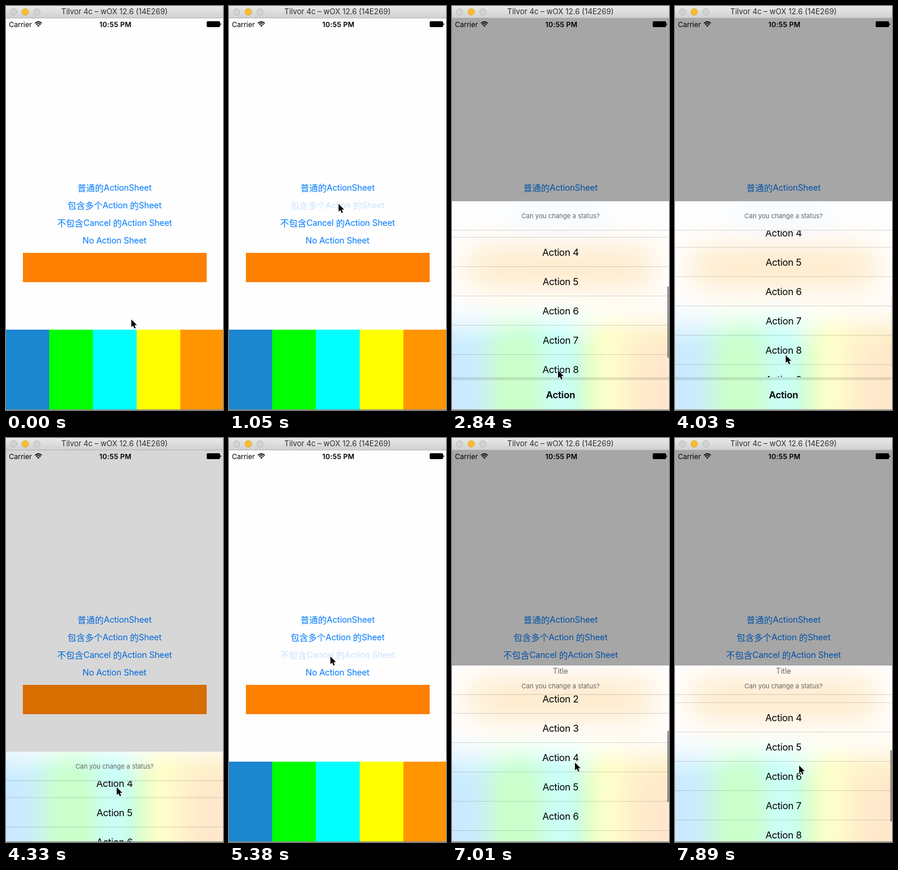
Write an HTML page that moves like this. It is 372 px wide and 689 px high and loops after 8 s.

```html
<!DOCTYPE html>
<html lang="en">
<head>
<meta charset="utf-8">
<title>Action sheets</title>
<style>
  html, body { margin: 0; width: 100%; height: 100%; overflow: hidden; }
  body { position: relative; background: #fefefe; color: #000; font-family: Inter, "Noto Sans CJK SC", "Noto Sans CJK JP", sans-serif; }
  #stage, #stage div, #stage svg { position: absolute; box-sizing: border-box; }
  #stage { left: 0; top: 0; width: 372px; height: 689px; overflow: hidden; }
  .line { left: 0; width: 372px; text-align: center; white-space: nowrap; }

  .page { left: 0; top: 0; width: 372px; height: 689px; background: #fefefe; }
  .link { height: 30px; line-height: 30px; color: #007aff; font-size: 14.6px; letter-spacing: -.17px; }
  .link i { position: relative; top: 1px; font-style: normal; font-size: 15px; letter-spacing: 0; }
  .bar { left: 29px; top: 421px; width: 315px; height: 50px; background: #ff8000; }
  .col { top: 552px; height: 240px; }

  #status { left: 0; top: 21px; width: 372px; height: 21px; font-size: 12px; line-height: 21px; }
  #dim { left: 0; top: 21px; width: 372px; height: 668px; background: #000; }

  .sheet { left: 0; width: 372px; overflow: hidden; background: #fff; }
  .glass { left: 0; width: 372px; height: 689px; opacity: .2; }
  .glass .page { left: -100px; width: 572px; height: 800px; filter: blur(30px) saturate(1.8); }
  .glass .shift { left: 100px; top: 0; width: 372px; height: 800px; }
  .head { left: 0; top: 0; width: 372px; height: 50px; border-bottom: 1px solid rgba(0,0,0,.16); color: #666; }
  .msg { font-size: 11px; line-height: 20px; height: 20px; }
  .title { font-size: 12.7px; line-height: 20px; top: 0; height: 20px; }
  .list { left: 0; top: 50px; width: 372px; height: 250px; overflow: hidden; }
  .rows { left: 0; top: 0; width: 372px; }
  .row { height: 50px; line-height: 50px; font-size: 16.5px; letter-spacing: -.33px; border-bottom: 1px solid rgba(0,0,0,.14); }
  .thumb { left: 369px; width: 2.5px; height: 122px; border-radius: 2px; background: rgba(0,0,0,.4); }
  .gap { left: 0; top: 300px; width: 372px; height: 5px; background: rgba(0,0,0,.1); }
  .cancel { top: 305px; border: 0; font-weight: 600; letter-spacing: -.25px; }

  #chrome { left: 0; top: 0; width: 372px; height: 21px; background: linear-gradient(#e9e9e9, #d1d1d1); border-bottom: 1px solid #b4b4b4; font-size: 12.9px; line-height: 20px; color: #2e2e2e; }
  .dot { top: 4px; width: 12px; height: 12px; border-radius: 50%; background: #d2d2d2; border: 1px solid #b9b9b9; }
  #edge { left: 0; top: 688px; width: 372px; height: 1px; background: #858585; }
  #cursor { left: 0; top: 0; overflow: visible; }
</style>
</head>
<body>
<div id="stage">
  <div class="page" id="page">
    <div class="shift">
      <div class="line link" style="top:295px"><i>普通的</i>ActionSheet</div>
      <div class="line link" style="top:325px"><i>包含多个</i>Action <i>的</i>Sheet</div>
      <div class="line link" style="top:355px"><i>不包含</i>Cancel <i>的</i>Action Sheet</div>
      <div class="line link" style="top:385px">No Action Sheet</div>
      <div class="bar"></div>
      <div class="col" style="left:-100px;width:174px;background:#1a87cf"></div>
      <div class="col" style="left:74px;width:75px;background:#0f0"></div>
      <div class="col" style="left:149px;width:75px;background:#0ff"></div>
      <div class="col" style="left:224px;width:75px;background:#ff0"></div>
      <div class="col" style="left:299px;width:173px;background:#ff9500"></div>
    </div>
  </div>

  <div id="status">
    <div style="left:5px">Carrier</div>
    <svg style="left:49px;top:5px" width="13" height="10" viewBox="0 0 13 10" fill="none" stroke="#000" stroke-width="1.7">
      <path d="M.7 3.6Q6.5-1.6 12.3 3.6M2.7 5.8Q6.5 2.3 10.3 5.8"/>
      <path d="M6.5 9.6L4.4 7.4Q6.5 5.6 8.6 7.4Z" fill="#000" stroke="none"/>
    </svg>
    <div class="line" style="left:1.5px;font-weight:600;letter-spacing:.2px">10:55 PM</div>
    <svg style="left:344px;top:5px" width="25" height="11" viewBox="0 0 25 11">
      <rect width="23" height="10" rx="2"/>
      <path d="M23.4 3.2Q25 3.8 25 5T23.4 6.8Z"/>
    </svg>
  </div>

  <div id="dim"></div>
  <div class="sheet" id="many"></div>
  <div class="sheet" id="plain"></div>

  <div id="chrome">
    <div class="dot" style="left:7px"></div>
    <div class="dot" style="left:27px;background:#fdbd2f;border-color:#e0a02a"></div>
    <div class="dot" style="left:47px"></div>
    <div class="line">Tilvor 4c – wOX 12.6 (14E269)</div>
  </div>
  <div id="edge"></div>
  <svg id="cursor" width="14" height="20" viewBox="0 0 14 20">
    <path transform="translate(.8 1.4) scale(.92)" d="M0 0V14.6L3.4 11.4 5.8 17 8.2 16 5.9 10.6H10.4Z" stroke="#fff" stroke-width="1.1" paint-order="stroke"/>
  </svg>
</div>

<script>
// The screen refreshes in even steps; all times are in seconds.
const LOOP = 8, STEP = .14875, SLIDE = .3;
const $ = id => document.getElementById(id);
const links = document.querySelectorAll('#page .link');

const clamp = u => Math.min(1, Math.max(0, u));
const ease = u => (u = clamp(u), u * u * (3 - 2 * u));

// The pointer glides from place to place; a drag scrolls the open list and coasts on.
const hand = [];
let spot = { x: 214, y: 533 };
function move(start, end, x, y, coast) {
  hand.push({ start, end, x, y, coast, from: spot });
  spot = { x, y };
}
const drag = move;

move(.1, .85, 187, 336);
move(1.2, 1.8, 182, 563);
drag(1.82, 2.4, 181, 448, 32);
move(2.4, 2.6, 181, 661);
drag(2.6, 2.993, 181, 594, 7);
move(3, 3.4, 189, 594);
move(4.3, 5, 173, 371);
move(5.36, 5.65, 199, 444);
move(5.65, 6.3, 209, 640);
drag(6.4, 6.85, 210, 545, 28);
move(6.9, 7.4, 211, 620);
drag(7.45, 7.88, 212, 557, 0);

const sheets = [
  { el: $('many'), link: links[1], top: 333, height: 355, open: 1.04, close: 4.15, cancel: 'Action' },
  { el: $('plain'), link: links[2], top: 388, height: 300, open: 5.35, close: 9, title: 'Title' }
];

function build(s) {
  const rows = Array.from({ length: 10 }, (_, i) =>
    `<div class="line row" style="top:${i * 50}px">Action ${i}</div>`).join('');
  s.el.style.top = s.top + 'px';
  s.el.style.height = s.height + 'px';
  s.el.innerHTML = `
    <div class="glass" aria-hidden="true"></div>
    <div class="head">
      ${s.title ? `<div class="line title">${s.title}</div>` : ''}
      <div class="line msg" style="top:${s.title ? 25 : 15}px">Can you change a status?</div>
    </div>
    <div class="list"><div class="rows">${rows}</div><div class="thumb"></div></div>
    ${s.cancel ? `<div class="gap"></div><div class="line row cancel">${s.cancel}</div>` : ''}`;
  const copy = $('page').cloneNode(true);
  copy.removeAttribute('id');
  s.glass = s.el.querySelector('.glass');
  s.glass.append(copy);
  s.rows = s.el.querySelector('.rows');
  s.thumb = s.el.querySelector('.thumb');
  s.drags = hand.filter(h => h.coast !== undefined && h.start > s.open && h.start < s.close);
}

const moveTo = (el, x, y) => { el.style.transform = `translate(${Math.round(x)}px, ${Math.round(y)}px)`; };
const progress = (h, t) => ease((t - h.start) / (h.end - h.start));

function drawSheet(s, t) {
  const shown = ease((t - s.open) / SLIDE) * (1 - ease((t - s.close) / SLIDE));
  const drop = Math.round((1 - shown) * s.height);
  let scroll = 0, glow = 0;
  for (const d of s.drags) {
    if (t < d.start) break;
    scroll += (d.from.y - d.y) * progress(d, t);
    scroll += d.coast * (1 - Math.exp(-Math.max(0, t - d.end) / .08));
    glow = clamp(1 - (t - d.end - .7) / .35);
  }
  s.el.style.visibility = shown > 0 ? 'visible' : 'hidden';
  s.link.style.opacity = Math.abs(t - s.open) < STEP / 2 ? .2 : 1;
  s.thumb.style.opacity = glow;
  moveTo(s.el, 0, drop);
  moveTo(s.glass, 0, -s.top - drop);
  moveTo(s.rows, 0, -scroll);
  moveTo(s.thumb, 0, 3 + scroll * .489);
  return shown;
}

function draw(t) {
  $('dim').style.opacity = .35 * Math.max(...sheets.map(s => drawSheet(s, t)));
  const h = hand.findLast(h => h.start <= t) || hand[0];
  const u = progress(h, t);
  moveTo($('cursor'), h.from.x + (h.x - h.from.x) * u, h.from.y + (h.y - h.from.y) * u);
}

let last = -1;
function tick() {
  const k = Math.floor(performance.now() / 1000 % LOOP / STEP);
  if (k !== last) draw((last = k) * STEP);
  requestAnimationFrame(tick);
}

sheets.forEach(build);
tick();
</script>
</body>
</html>
```
